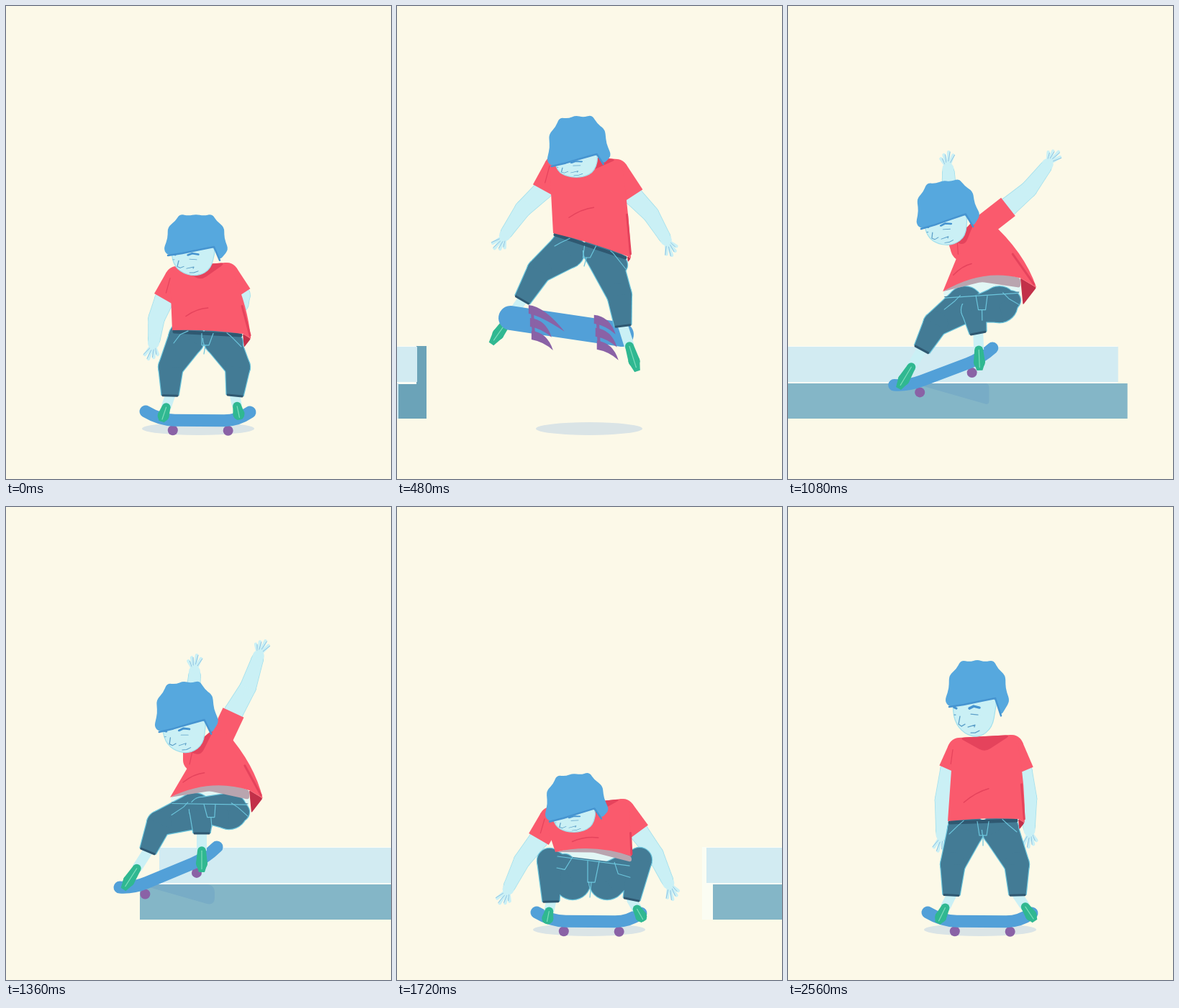
An HTML page with a canvas that plays this animation: 535 by 658 pixels, repeating every 2.64 s.

```html
<!DOCTYPE html>
<html>
<head>
<meta charset="utf-8">
<title>Skater</title>
<style>
html, body { margin: 0; width: 100%; height: 100%; overflow: hidden; background: #fcf9e8; }
canvas { display: block; width: 100vw; height: 100vh; }
</style>
</head>
<body>
<canvas id="stage" width="535" height="658"></canvas>
<script>
const ctx = document.getElementById('stage').getContext('2d');
const LOOP = 2640, STEP = 40;
const C = {
  bg: '#fcf9e8', skin: '#caf0f5', skinEdge: '#a3e0ec', line: '#5c9fc8', hair: '#56a8de', hairDark: '#4694d0',
  shirt: '#fa5a6d', fold: '#e5435c', back: '#c23049', grey: '#b9a5af', belly: '#e2f7f5',
  jeans: '#437b95', seam: '#6cc5dc', belt: '#2f5871', board: '#52a0d8', shoe: '#30b891', shoeLine: '#7fdcbc',
  wheel: '#8a62a6', shadow: '#dae4e6', top: '#d2ebf2', front: '#84b6c7', side: '#6ba3b8', shade: '#78acc6'
};

// Joints are left x,y then right x,y.
// look: head tilt, hair height, chin drop. deck: thickness, kick depth. cloth: back flap size, bare belly height.
const ground = { toes: [208,579, 343,576], board: [194,564, 339,565], deck: [17, 12] };
const stand = {
  ...ground, head: [262,270], look: [0, 55, 51], cloth: [.35, 0],
  shoulders: [238,337, 311,333], sleeves: [225,366, 326,368], wrists: [214,450, 335,444],
  hem: [222,437, 320,434], crotch: [271,471], knees: [229,497, 318,497], cuffs: [227,540, 319,540]
};
const dip = {
  ...ground, toes: [216,578, 325,575], head: [263,339], look: [0, 47, 37], cloth: [.45, 0],
  shoulders: [237,378, 307,373], sleeves: [220,408, 326,402], wrists: [206,463, 318,424],
  hem: [231,451, 329,456], crotch: [275,484], knees: [229,502, 322,502], cuffs: [228,542, 318,542]
};
const squat = {
  ...ground, head: [249,426], look: [-.1, 53, 27], cloth: [0, 8],
  shoulders: [214,433, 314,422], sleeves: [197,462, 336,452], wrists: [157,526, 375,518],
  hem: [220,480, 326,486], crotch: [268,543], knees: [212,492, 337,491], cuffs: [214,549, 326,546]
};
const flip = {
  head: [252,212], look: [-.08, 57, 27], cloth: [.2, 0],
  shoulders: [221,223, 305,229], sleeves: [203,256, 328,264], wrists: [153,314, 371,320],
  hem: [217,316, 320,348], crotch: [260,362], knees: [198,368, 309,402], cuffs: [174,409, 314,445],
  toes: [131,470, 334,508], board: [158,434, 312,457], deck: [34, 0]
};
const lock = {
  head: [199,293], look: [-.18, 48, 33], cloth: [1, 14],
  shoulders: [227,328, 252,293], sleeves: [212,302, 298,274], wrists: [192,230, 364,235],
  hem: [205,392, 311,366], crotch: [257,431], knees: [199,444, 247,424], cuffs: [177,477, 258,456],
  toes: [146,532, 262,506], board: [139,526, 277,478], deck: [16, 8]
};
const slide = {
  head: [250,302], look: [-.08, 57, 41], cloth: [.75, 13],
  shoulders: [262,352, 300,320], sleeves: [262,325, 316,286], wrists: [262,235, 349,213],
  hem: [228,404, 338,394], crotch: [286,445], knees: [213,440, 272,421], cuffs: [197,479, 272,454],
  toes: [163,532, 272,508], board: [158,529, 293,473], deck: [17, 9]
};

const clamp = u => Math.max(0, Math.min(1, u));
const smooth = u => u * u * (3 - 2 * u), easeIn = u => u * u, easeOut = u => u * (2 - u), linear = u => u;
const ramp = (t, a, b) => clamp((t - a) / (b - a));
const mix = (a, b, u) => a.map((v, i) => v + (b[i] - v) * u);
const add = (p, dx, dy) => [p[0] + dx, p[1] + dy];
const pt = (list, i) => [list[2 * i], list[2 * i + 1]];
const SCALARS = ['look', 'deck', 'cloth'];
const mapPose = (pose, fn) => Object.fromEntries(Object.entries(pose).map(([k, v]) => [k, fn(v, k)]));
const lift = (pose, dy) => mapPose(pose, (v, k) => SCALARS.includes(k) ? v : v.map((n, i) => i % 2 ? n - dy : n));

const apex = { ...lift(flip, 28), sleeves: [198,224, 328,234], wrists: [128,212, 412,221] };
const keys = [
  [0, dip], [120, squat, easeOut], [260, stand, smooth], [480, flip, easeOut], [560, apex, easeOut],
  [680, lift(lock, 95), linear], [800, lock, easeIn], [840, lock, linear], [1360, slide, smooth],
  [1460, lift(slide, 66), easeOut], [1640, squat, easeIn], [1760, squat, linear], [2000, stand, smooth], [LOOP, stand, linear]
];

function poseAt(t) {
  const i = keys.findIndex(k => k[0] > t);
  const [t0, a] = keys[i - 1], [t1, b, ease] = keys[i];
  const u = ease((t - t0) / (t1 - t0));
  return mapPose(a, (v, k) => mix(v, b[k], u));
}
function track(t, ...stops) {
  const i = stops.findIndex(s => s[0] > t);
  if (i < 0) return stops[stops.length - 1][1];
  if (i === 0) return stops[0][1];
  const [a, b] = [stops[i - 1], stops[i]];
  return a[1] + (b[1] - a[1]) * (t - a[0]) / (b[0] - a[0]);
}

function toward(a, b, d) {
  const len = Math.hypot(b[0] - a[0], b[1] - a[1]) || 1;
  return mix(a, b, Math.min(d / len, .5));
}
// Polygon with rounded corners.
function trace(points, r) {
  const n = points.length;
  ctx.beginPath();
  points.forEach((p, i) => {
    ctx.lineTo(...toward(p, points[(i + n - 1) % n], r));
    ctx.quadraticCurveTo(...p, ...toward(p, points[(i + 1) % n], r));
  });
  ctx.closePath();
}
function shape(points, r, fill, edge) {
  trace(points, r);
  ctx.fillStyle = fill;
  ctx.fill();
  if (edge) { ctx.strokeStyle = edge; ctx.lineWidth = 1.2; ctx.stroke(); }
}
function line(points, color, width) {
  ctx.beginPath();
  points.forEach(p => ctx.lineTo(...p));
  ctx.strokeStyle = color;
  ctx.lineWidth = width;
  ctx.stroke();
}
function oval(x, y, rx, ry, fill) {
  ctx.beginPath();
  ctx.ellipse(x, y, rx, ry, 0, 0, 7);
  ctx.fillStyle = fill;
  ctx.fill();
}
function rect(x0, y0, x1, y1, fill) {
  if (x1 <= x0) return;
  ctx.fillStyle = fill;
  ctx.fillRect(x0, y0, x1 - x0, y1 - y0);
}
// Tapered chain with round joints and a flat end.
function limb(joints, radii, color, grow = 0) {
  joints.slice(1).forEach((b, i) => {
    const a = joints[i], r0 = radii[i] + grow, r1 = radii[i + 1] + grow;
    const ang = Math.atan2(b[1] - a[1], b[0] - a[0]), c = Math.cos(ang), s = Math.sin(ang);
    oval(...a, r0, r0, color);
    shape([add(a, -s * r0, c * r0), add(b, -s * r1, c * r1), add(b, s * r1, -c * r1), add(a, s * r0, -c * r0)], 0, color);
  });
}

function drawLedge(t, p) {
  if (t < 400 || t > 1880) return;
  const right = track(t, [410, 0], [480, 41], [840, 254], [1120, 508], [1200, 580]);
  const left = track(t, [1160, -30], [1161, 0], [1360, 186], [1720, 439], [1880, 551]);
  const inset = track(t, [1360, 27], [1720, -9]);
  const depth = track(t, [480, 39], [840, 0]);
  rect(right - depth, 473, right, 574, C.side);
  if (inset < 0) rect(left - 15, 473, 535, 574, '#fbfdf3');
  rect(left + inset, 473, right - 14, 526, '#fbfdf6');
  rect(left + inset, 474, right - 13, 523, C.top);
  rect(left, 525, right - depth, 574, C.front);
  if (depth > 0) rect(right - depth - 2, 525, right - depth, 574, C.top);
  if (t >= 760 && t < 1440) {
    const x = p.board[0] + 27, end = Math.min(right, x + 105);
    shape([[x, 525], [end, 525], [end, 555]], 12 * ramp(t, 840, 1360), C.shade);
  }
}

function drawArm(p, i) {
  const start = pt(p.sleeves, i), wrist = pt(p.wrists, i);
  const dx = wrist[0] - start[0], dy = wrist[1] - start[1], len = Math.hypot(dx, dy);
  const bow = (i ? 1 : -1) * Math.sign(dy) * 4;
  const elbow = add(mix(start, wrist, .5), bow * dy / len, -bow * dx / len);
  // Hands hang closer to the vertical than the forearm.
  const dir = Math.atan2(dy, dx * .7), c = Math.cos(dir), s = Math.sin(dir);
  const palm = add(wrist, c * 6, s * 6);
  [.8, 0].forEach(grow => limb([start, elbow, wrist, palm], [13, 11, 8, 7], grow ? C.skinEdge : C.skin, grow));
  oval(...palm, 8, 8, C.skin);
  for (let f = 0; f < 4; f++) {
    const a = dir + (f - 1.6) * .33, reach = 23 - 3 * Math.abs(f - 2);
    const tip = add(palm, Math.cos(a) * reach, Math.sin(a) * reach);
    line([palm, tip], C.skin, 4.5);
    line([mix(palm, tip, .45), add(tip, -s * 2, c * 2)], '#8fc3e2', 1);
  }
}

function drawFoot(p, i) {
  const cuff = pt(p.cuffs, i), toe = pt(p.toes, i), ankle = mix(cuff, toe, .45);
  limb([cuff, ankle], [7, 7], C.skin);
  limb([ankle, mix(ankle, toe, .6), toe], [6, 8, 4], C.shoe);
  line([ankle, mix(ankle, toe, .85)], C.shoeLine, 1.2);
}

function drawBoard(p, spinning) {
  const tail = pt(p.board, 0), tip = pt(p.board, 1), [width, kick] = p.deck;
  const low = u => add(mix(tail, tip, u), 0, kick);
  if (!spinning) [.24, .77].forEach(u => oval(...add(low(u), 3, 14), 7, 7, C.wheel));
  ctx.beginPath();
  ctx.moveTo(...tail);
  ctx.quadraticCurveTo(...low(.14), ...low(.28));
  ctx.lineTo(...low(.75));
  ctx.quadraticCurveTo(...low(.88), ...tip);
  ctx.strokeStyle = C.board;
  ctx.lineWidth = width;
  ctx.stroke();
  if (spinning) drawStreaks(tail, tip);
}
// Blurred wheels: three crescents per axle.
function drawStreaks(tail, tip) {
  [.22, .81].forEach((u, axle) => {
    const [x, y] = mix(tail, tip, u);
    for (let i = 0; i < 3; i++) {
      const reach = axle || i ? 30 : 50, x0 = x - 9 + i * 2, y0 = y - 18 + i * 18;
      ctx.beginPath();
      ctx.moveTo(x0, y0 - 5);
      ctx.quadraticCurveTo(x0 + 22, y0 - 3, x0 + reach, y0 + 7 + reach / 2);
      ctx.quadraticCurveTo(x0 + 17, y0 + 10, x0, y0 + 7);
      ctx.fillStyle = C.wheel;
      ctx.fill();
    }
    line([[x - 4, y - 15], [x - 2, y + 18]], C.wheel, 4);
  });
}

function drawJeans(p) {
  const bare = p.cloth[1], hem = [pt(p.hem, 0), pt(p.hem, 1)];
  const waist = [add(hem[0], 0, bare * .5), add(hem[1], 0, bare * 1.4)];
  const crotch = pt(p.crotch, 0), middle = mix(...waist, .5);
  const legs = [0, 1].map(i => {
    const side = i ? 1 : -1;
    return [add(waist[i], -side * 13, 12), add(crotch, side * 24, -22), pt(p.knees, i), pt(p.cuffs, i)];
  });
  if (bare > .5) shape([hem[0], add(mix(...hem, .5), 0, -bare), hem[1], add(waist[1], 0, 6), add(waist[0], 4, 6)], 4, C.belly);
  const paint = (leg, color, grow) => limb(leg, [13, 25, 17, 11.5], color, grow);
  legs.forEach(leg => { paint(leg, C.seam, 1.2); paint(leg, C.jeans, 0); });
  shape([...waist, legs[1][1], legs[0][1]], 3, C.jeans);
  legs.forEach(([, , knee, cuff]) => {
    const ang = Math.atan2(cuff[1] - knee[1], cuff[0] - knee[0]), x = Math.sin(ang) * 10, y = -Math.cos(ang) * 10;
    line([add(cuff, x, y), add(cuff, -x, -y)], C.belt, 3);
  });
  line([add(waist[0], 3, 2), add(waist[1], -3, 2)], bare > 2 ? C.seam : C.belt, bare > 2 ? 1.2 : 5);
  const fly = mix(middle, crotch, .6);
  line([add(middle, -8, 2), add(fly, -5, 0), add(fly, 5, 0), add(middle, 8, 2)], C.seam, 1.2);
  line([fly, crotch], C.seam, 1.2);
  legs.forEach((leg, i) => line([mix(waist[i], middle, .45), mix(waist[i], leg[1], .55), add(leg[0], i ? 11 : -11, 6)], C.seam, 1.1));
}

function drawShirt(p) {
  const [flap, bare] = p.cloth;
  const [sl, sr] = [0, 1].map(i => pt(p.shoulders, i)), [hl, hr] = [0, 1].map(i => pt(p.hem, i));
  const span = Math.hypot(sr[0] - sl[0], sr[1] - sl[1]);
  const ux = (sr[0] - sl[0]) / span, uy = (sr[1] - sl[1]) / span;
  const top = s => add(s, uy * 16, -ux * 16);
  const outL = add(sl, -ux * 9, -uy * 9), outR = add(sr, ux * 9, uy * 9);
  const tail = add(hr, 25 * flap, 15 * flap), hemTop = add(mix(hl, hr, .5), 0, -4 - bare * 1.4);
  const bulge = add(mix(outR, tail, .55), 15 * flap, -8 * flap);

  shape([hr, tail, add(hr, 4 * flap, 42 * flap)], 2, C.back);
  if (bare > .5) shape([hl, hemTop, hr, add(hr, 0, bare), add(mix(hl, hr, .5), 0, -bare * .3)], 4, C.grey);
  [[sl, 0], [sr, 1]].forEach(([s, i]) => limb([s, pt(p.sleeves, i)], [16, 16], C.shirt));
  ctx.beginPath();
  ctx.moveTo(...outL);
  ctx.lineTo(...hl);
  ctx.quadraticCurveTo(...hemTop, ...hr);
  ctx.lineTo(...tail);
  ctx.quadraticCurveTo(...bulge, ...outR);
  ctx.lineTo(...top(sr));
  ctx.lineTo(...top(sl));
  ctx.fillStyle = C.shirt;
  ctx.fill();

  const collar = mix(top(sl), top(sr), .5);
  shape([top(sl), add(collar, 0, 22), top(sr)], 9, C.fold);
  line([mix(outR, tail, .5), mix(outR, tail, .95)], C.fold, 3);
  line([outL, mix(outL, pt(p.sleeves, 0), .7)], C.fold, 1.2);
  const a = mix(hl, sr, .25), b = add(mix(hl, sr, .55), 8, 12);
  ctx.beginPath();
  ctx.moveTo(...a);
  ctx.quadraticCurveTo(...add(mix(a, b, .5), 0, -5), ...b);
  ctx.strokeStyle = C.fold;
  ctx.lineWidth = 1.5;
  ctx.stroke();
}

function drawFeatures() {
  line([[-14, -23], [-7, -20]], C.hairDark, 3);
  line([[11, -20], [17, -23], [25, -21]], C.hairDark, 3.5);
  line([[-12, -11], [-8, -11]], C.line, 1.2);
  line([[13, -12], [23, -11]], C.line, 1.2);
  line([[-2, -9], [-4, 2], [0, 5], [5, 2]], C.line, 1.3);
  line([[9, 6], [19, 3], [18, 6]], C.line, 1.2);
  line([[13, 14], [19, 14], [25, 11]], C.line, 1.2);
}

// Head space starts at the middle of the fringe.
function drawHead(p) {
  const [tilt, height, chin] = p.look;
  ctx.save();
  ctx.translate(...p.head);
  ctx.rotate(tilt);
  const face = [[-34, -6], [-31, chin * .55], [-17, chin * .9], [4, chin], [22, chin * .72], [29, -6]];
  shape(face, 13, C.skin, C.skinEdge);
  ctx.save();
  trace(face, 13);
  ctx.clip();
  ctx.translate(-21, chin * .59);
  ctx.scale(1, chin / 51);
  drawFeatures();
  ctx.restore();

  const tufts = [];
  for (let i = 0; i <= 12; i++) {
    const a = Math.PI * (1 + i / 12), jag = i % 2 ? .95 : 1.05;
    tufts.push([43 * Math.cos(a) * jag + 1, height * Math.sin(a) * jag - 8 * Math.abs(Math.sin(2 * a))]);
  }
  const fringe = [[34, chin * .4], [26, -4], [6, 0], [-18, 5], [-38, 8]];
  shape([...tufts, ...fringe], 6, C.hair);
  line(fringe, C.hairDark, 2.5);
  ctx.restore();
}

function draw(t) {
  const p = poseAt(t), spinning = t >= 360 && t < 600;
  rect(0, 0, 535, 658, C.bg);
  ctx.globalAlpha = Math.max(1 - ramp(t, 560, 680), ramp(t, 1540, 1640));
  oval(267, 588, track(t, [260, 78], [480, 74], [1600, 74], [1640, 78]), 9, C.shadow);
  ctx.globalAlpha = 1;
  drawLedge(t, p);
  drawArm(p, 0);
  drawArm(p, 1);
  if (spinning) drawFoot(p, 0);
  drawBoard(p, spinning);
  if (!spinning) drawFoot(p, 0);
  drawFoot(p, 1);
  drawJeans(p);
  drawShirt(p);
  drawHead(p);
}

ctx.lineCap = ctx.lineJoin = 'round';
const start = performance.now();
function tick() {
  const t = (performance.now() - start) % LOOP;
  draw(Math.floor(t / STEP) * STEP);
  requestAnimationFrame(tick);
}
tick();
</script>
</body>
</html>
```
